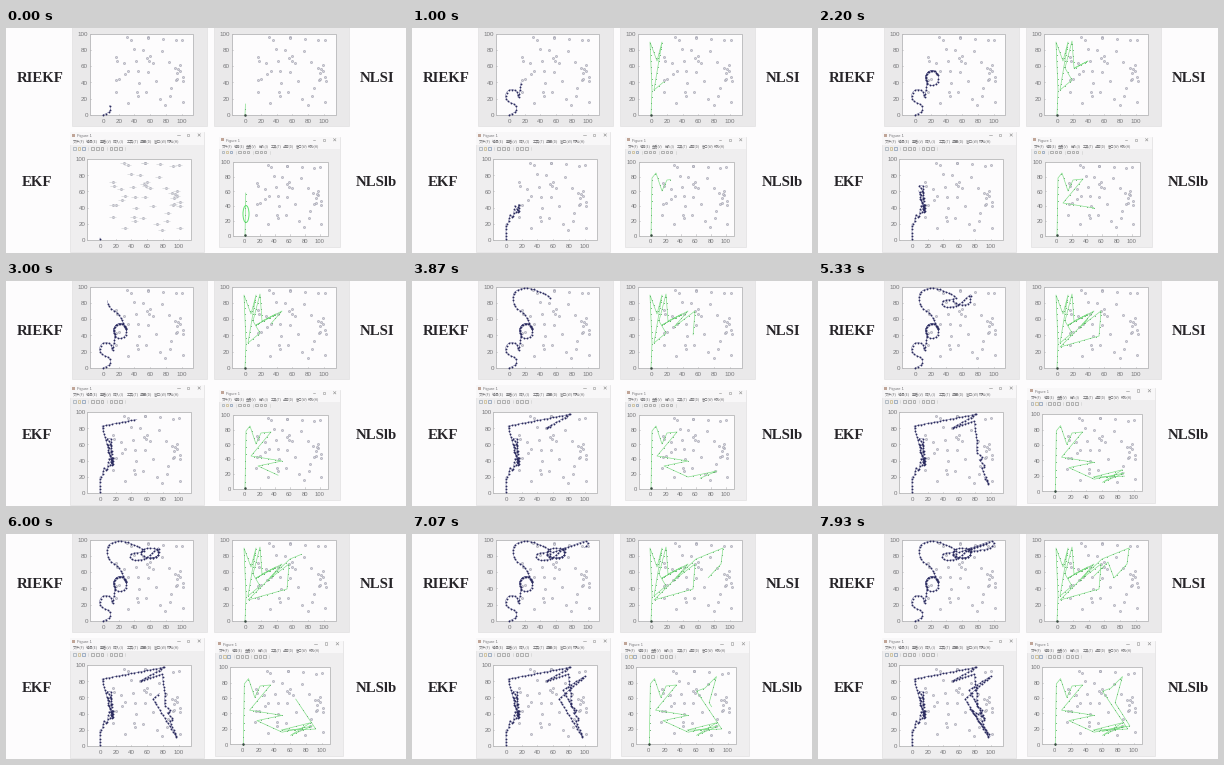
Write a matplotlib script that moves like this. It is 400 px wide and 225 px high and loops after 8000 ms.

```python
import numpy as np
import matplotlib.pyplot as plt
from matplotlib.animation import FuncAnimation
from matplotlib.patches import Ellipse, Rectangle
from matplotlib.transforms import Affine2D

W, H = 400, 225
PX = 0.72                      # points per pixel at 100 dpi
FRAMES, STEP = 125, 64
RESIZE_AT = 4300               # lower right window grows here
EDGE, INK = "#b4b4b6", "#77777a"

fig = plt.figure(figsize=(W / 100, H / 100), dpi=100, facecolor="#fdfcfd")
ax = fig.add_axes([0, 0, 1, 1])
ax.set_xlim(0, W)
ax.set_ylim(H, 0)
ax.axis("off")

zoom = Affine2D()
PLAIN = ax.transData
ZOOMED = zoom + ax.transData

rng = np.random.default_rng(4)
LANDMARKS = rng.uniform((10, 8), (104, 99), (46, 2))


# --- drawing helpers ---

def text(x, y, s, size, tr=PLAIN, color=INK, font="Liberation Sans", **kw):
    kw = {"ha": "center", "va": "center_baseline", **kw}
    ax.text(x, y, s, fontsize=size * PX, color=color, family=font,
            transform=tr, **kw)


def rect(x0, y0, x1, y1, face, edge="none", lw=0.6, tr=PLAIN, z=1):
    ax.add_patch(Rectangle((x0, y0), x1 - x0, y1 - y0, facecolor=face,
                           edgecolor=edge, lw=lw * PX, transform=tr, zorder=z))


def plot(x, y, tr=PLAIN, z=4, **kw):
    return ax.plot(x, y, transform=tr, zorder=z, **kw)[0]


def chart(window, box, origin, scale, tr=PLAIN, face="#eae9ea", size=6.3):
    """Grey window, white plot box, ticks, labels and landmarks."""
    rect(*window, face, "#dadada", 0.5, tr)
    rect(*box, "#fdfcfd", EDGE, 0.8, tr, z=2)
    x0, y0, x1, y1 = box
    for v in range(0, 101, 20):
        x, y = origin[0] + v * scale, origin[1] - v * (y1 - y0) / 100
        plot([x, x], [y1, y1 - 1.2], tr, color=EDGE, lw=0.4)
        plot([x0, x0 + 1.2], [y, y], tr, color=EDGE, lw=0.4)
        text(x, y1 + 5.6, str(v), size, tr)
        text(x0 - 1.6, y + 0.3, str(v), size, tr, ha="right")
    pts = LANDMARKS * (scale, (y0 - y1) / 100) + origin
    plot(*pts.T, tr, z=3, ls="", marker="o", ms=1.5, mew=0.4, mfc="#d4d4dc",
         mec="#9c9caa")
    return pts


def chrome(x0, y0, x1, k=1.0, tr=PLAIN):
    """Title bar, menu row and tool bar of a figure window."""
    rect(x0, y0, x1, y0 + 13 * k, "#f8f7f8", tr=tr, z=2)
    rect(x0 + 2, y0 + 1.6 * k, x0 + 5, y0 + 4.6 * k, "#c0a598", tr=tr, z=3)
    text(x0 + 7, y0 + 3.3 * k, "Figure 1", 4.1 * k, tr, ha="left")
    y = y0 + 3 * k
    style = dict(tr=tr, color="#8a8a8a", lw=0.4)
    plot([x1 - 27, x1 - 24.5], [y, y], **style)
    rect(x1 - 17, y - 1.2, x1 - 14.6, y + 1.2, "none", "#8a8a8a", 0.5, tr, 3)
    for s in (-1, 1):
        plot([x1 - 6, x1 - 3.6], [y - 1.2 * s, y + 1.2 * s], **style)
    for i, (name, key) in enumerate(zip(
            "文件 编辑 查看 插入 工具 桌面 窗口 帮助".split(), "FEVITDWH")):
        text(x0 + 3 + 13.4 * k * i, y0 + 9.2 * k, f"{name}({key})", 3.6 * k,
             tr, font="Noto Sans CJK JP", ha="left")
    tints = ["#a8b2bc", "#cdbd92", "#8fa3bd", "#a4a4a4"]
    for i in range(12):
        x, yy = x0 + 3 + 4.6 * k * i, y0 + 15 * k
        if i % 4 < 3:
            rect(x, yy, x + 2.6 * k, yy + 2.8 * k, "#ececec",
                 tints[i % 3 if i < 3 else 3], 0.8, tr, 3)
        else:
            plot([x + 1.5] * 2, [yy, yy + 3], tr, color="#cccccc", lw=0.4)


# --- path helpers ---

def loop(cx, cy, rx, ry, phase, turns):
    """Points round an ellipse, clockwise on screen, from phase in degrees."""
    a = np.radians(phase) + np.linspace(0, 2 * np.pi * turns, int(8 * turns) + 1)
    return list(zip(cx + rx * np.cos(a), cy + ry * np.sin(a)))


def zigzag(a, b, n, amp):
    """Points from a to b, thrown to either side of the line in turn."""
    a, b = np.array(a, float), np.array(b, float)
    step = (b - a) / np.hypot(*(b - a))
    side = amp * np.array([-step[1], step[0]]) - amp * step
    return [tuple(a + (b - a) * i / (n - 1) + side * (-1) ** i)
            for i in range(n)]


def smooth(pts, n=8):
    """Catmull-Rom curve with n steps per span."""
    p = np.vstack([2 * pts[0] - pts[1], pts, 2 * pts[-1] - pts[-2]])
    u = (np.arange(n) / n)[:, None]
    spans = [0.5 * (2 * b + (c - a) * u + (2 * a - 5 * b + 4 * c - d) * u**2
                    + (3 * b - a - 3 * c + d) * u**3)
             for a, b, c, d in zip(p, p[1:], p[2:], p[3:])]
    return np.vstack(spans + [pts[-1:]])


class Track:
    """Path that grows from a first length; pace below 1 starts fast."""

    def __init__(self, pts, first, pace, gap, line, dots, tr=PLAIN,
                 curved=False):
        pts = np.array(pts, float)
        self.pts = smooth(pts) if curved else pts
        self.first, self.pace, self.gap = first, pace, gap
        self.dist = np.r_[0, np.cumsum(np.hypot(*np.diff(self.pts, axis=0).T))]
        self.line = plot([], [], tr, z=5, solid_joinstyle="round", **line)
        self.dots = plot([], [], tr, z=6, ls="", marker="o", mew=0, **dots)

    def at(self, s):
        return [np.interp(s, self.dist, col) for col in self.pts.T]

    def update(self, u):
        s = self.first + (self.dist[-1] - self.first) * u ** self.pace
        n = np.searchsorted(self.dist, s)
        self.line.set_data(*self.at(np.r_[self.dist[:n], s]))
        self.dots.set_data(*self.at(np.arange(0, s + 0.01, self.gap)))


# --- windows and titles ---

chart((66, -1, 201, 98), (83.5, 5.5, 187, 87), (97, 87), 0.785)
chart((208, -1, 343, 98), (225.5, 5.5, 329.5, 87), (239, 87), 0.79)
lower = chart((64, 104, 198, 224), (81, 131, 184.5, 212), (94, 212), 0.785,
              face="#efeeef", size=6.1)
chart((212.5, 109, 333.5, 219), (226.5, 134, 321.5, 207.5), (238.5, 207.5),
      0.75, ZOOMED, "#efeeef", 5.9)
chrome(64, 104, 198)
chrome(212.5, 109, 333.5, 0.92, ZOOMED)

for x, y, name in [(34, 49.3, "RIEKF"), (371.5, 49.3, "NLSI"),
                   (30.8, 153.3, "EKF"), (370.3, 153.5, "NLSlb")]:
    text(x, y, name, 14.9, color="#262428", font="Liberation Serif",
         weight="bold")

# --- the four estimates ---

riekf = ([(97, 87), (104, 83), (103, 77)]
         + loop(100, 68, 6.5, 6.5, 120, 0.7)
         + loop(114, 50, 6.5, 7.5, 140, 1.6)
         + [(113, 34), (103, 25), (102, 12), (114, 7), (128, 11), (138, 17),
            (125, 20), (127, 26), (140, 24), (152, 14)]
         + loop(144, 19, 9, 5, -20, 1.5)
         + [(156, 13), (174, 7), (172, 14), (150, 17), (174, 8)])
ekf = ([(94, 211), (94, 196)]
       + zigzag((96, 192), (107, 179), 6, 2)
       + zigzag((105, 183), (103, 156), 9, 2)
       + [(106, 182), (96, 145), (159, 133), (134, 147), (156, 140),
          (159, 160)]
       + zigzag((161, 172), (166, 188), 5, 2)
       + [(171, 204), (147, 165), (173, 142), (151, 156), (166, 184),
          (152, 175), (175, 206)])
nlsi = [(239, 87), (240, 62), (238, 14), (245, 33), (250, 14), (242, 62),
        (254, 52), (247, 40), (254, 13), (256, 40), (270, 33), (250, 44),
        (276, 30), (262, 46), (283, 30), (281, 55), (242, 66), (268, 40),
        (284, 25), (311, 14), (309, 30), (296, 44), (290, 28), (274, 44)]
nlslb = [(239, 208), (240, 150), (244, 145), (250, 163), (255, 152),
         (265, 151), (245, 175), (276, 180), (252, 185), (276, 196),
         (305, 190), (284, 199), (303, 187), (275, 194), (308, 193),
         (284, 157), (292, 154), (303, 143), (296, 168), (310, 190),
         (280, 196)]

navy = dict(color="#6c6c98", lw=0.35), dict(color="#2b2b5e", ms=1.35)
green = dict(color="#86df8c", lw=0.5), dict(color="#5fae6a", ms=0.75)

tracks = [Track(riekf, 14, 1, 3.2, *navy, curved=True),
          Track(ekf, 1, 1, 3.2, *navy),
          Track(nlsi, 11, 0.6, 6, *green),
          Track(nlslb, 43, 1, 7, *green, ZOOMED)]

for x, y, tr in [(239, 86.5, PLAIN), (238.8, 207.4, ZOOMED)]:
    plot([x], [y], tr, z=7, marker="o", ms=1.8, mew=0, color="#3a4a42")

# Brief opening details: faint dashes and the first estimate's loop
opening = [
    ax.hlines(lower[:, 1], lower[:, 0] - 4, lower[:, 0] + 3, color="#d0d2d6",
              lw=0.45, zorder=3),
    ax.add_patch(Ellipse((240, 186), 6, 17, fill=False, ec="#5fe36c", lw=0.7,
                         zorder=5))]


def draw(i):
    t = i * STEP
    zoom.clear()
    if t >= RESIZE_AT:
        zoom.translate(-273.5, -152).scale(1.05).translate(273.5, 152)
    for track in tracks:
        track.update(i / (FRAMES - 1))
    for item in opening:
        item.set_visible(t < 130)
    return []


anim = FuncAnimation(fig, draw, frames=FRAMES, interval=STEP, repeat=True,
                     repeat_delay=0, init_func=lambda: draw(0), blit=False)
plt.show()
```
